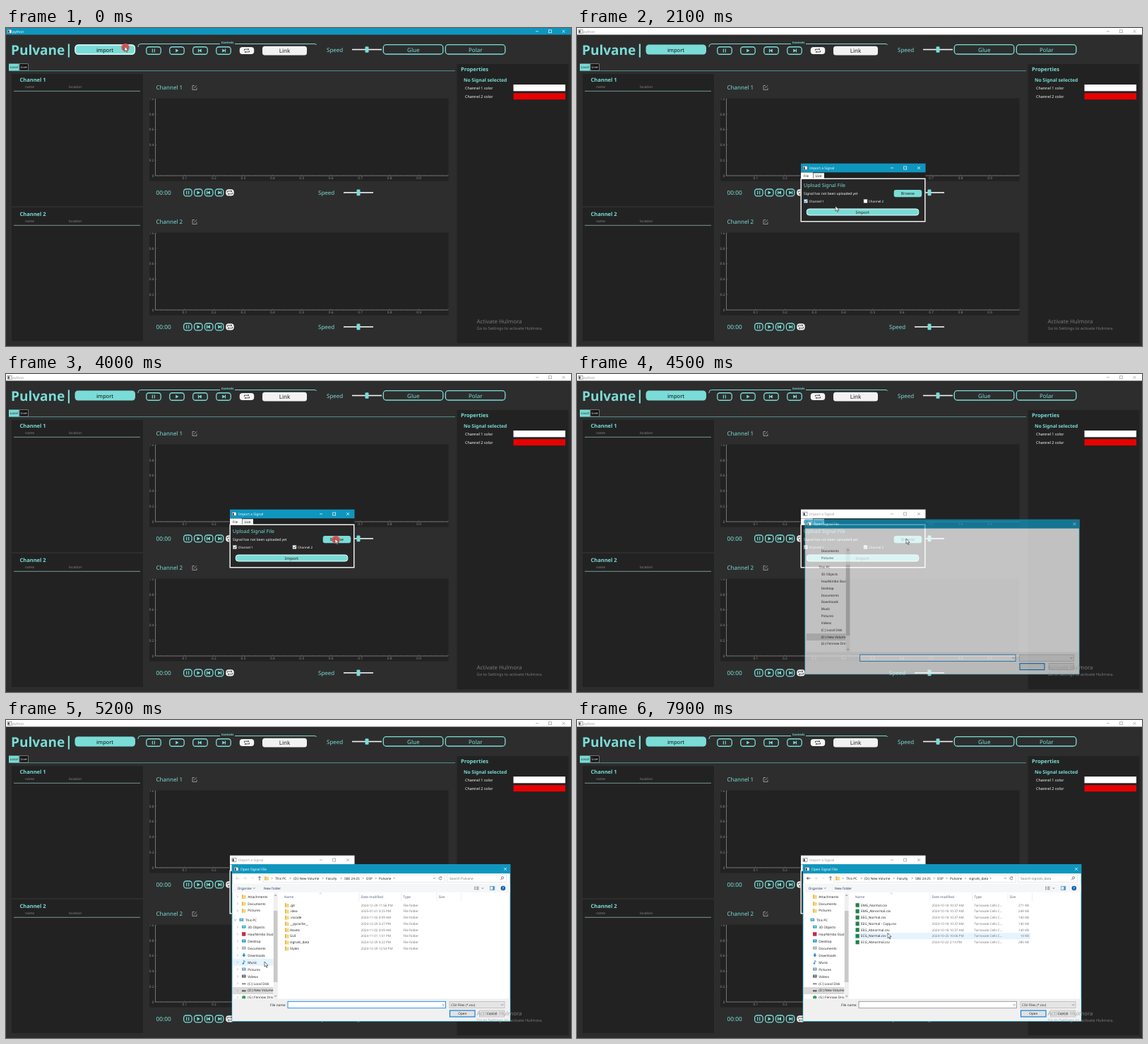
Animation, 800 px wide and 450 px high, one loop 8000 ms. Source, as an HTML page:

```html
<!DOCTYPE html>
<html lang="en">
<head>
<meta charset="utf-8">
<title>Signal viewer</title>
<style>
html, body { margin: 0; width: 100%; height: 100%; overflow: hidden; background: #2d2d2d; }
svg { display: block; width: 100%; height: 100%; }
text { font-family: "Noto Sans", "Open Sans", sans-serif; white-space: pre; text-rendering: geometricPrecision; }
.bar { --bg: #fff; --fg: #999; }
.bar.on { --bg: #0f96be; --fg: #fff; }
.opening .late { display: none; }
</style>
</head>
<body>
<svg id="stage" viewBox="0 0 800 450" preserveAspectRatio="none"></svg>
<script>
const AQUA = '#7adcd7', PANEL = '#222', BLUE = '#0078d7';

// Shape helpers; text is placed by the vertical centre of its capitals.
const rect = (x, y, w, h, fill, more = '') =>
  `<rect x="${x}" y="${y}" width="${w}" height="${h}" fill="${fill}" ${more}/>`;
const text = (x, y, str, size, fill, more = '') =>
  `<text x="${x}" y="${(y + size * 0.357).toFixed(2)}" font-size="${size}" fill="${fill}" ${more}>${str}</text>`;
const line = (d, stroke, width = 1, more = '') =>
  `<path d="${d}" fill="none" stroke="${stroke}" stroke-width="${width}" ${more}/>`;
const shape = (d, fill) => `<path d="${d}" fill="${fill}"/>`;
const group = (id, body, more = '') => `<g id="${id}" ${more}>${body}</g>`;
const MID = 'text-anchor="middle"', END = 'text-anchor="end"', BOLD = 'font-weight="700"';
const stroked = (color, width, r = 0) => `stroke="${color}" stroke-width="${width}" rx="${r}"`;

function titleBar(id, x, y, w, h, title, buttons) {
  const cy = y + h / 2, fg = 'var(--fg)';
  const [min, max, close] = buttons;
  return group(id,
    rect(x, y, w, h, 'var(--bg)') +
    rect(x + 3, cy - 2.5, 6, 5, '#fff', stroked('#555', 0.5)) +
    rect(x + 3.7, cy - 1.3, 2.2, 3.2, '#345') +
    text(x + (w > 700 ? 10 : 12), cy, title, 4.9, fg) +
    (min ? line(`M${min - 2} ${cy}h4`, fg, 0.7) : '') +
    (max ? rect(max - 2, cy - 2, 4, 4, 'none', stroked(fg, 0.7)) : '') +
    line(`M${close - 2} ${cy - 2}l4 4m0 -4l-4 4`, fg, 0.7), 'class="bar"');
}

function glyph(kind, x, y, s, color) {
  const bar = dx => rect(x + dx * s - s * 0.35, y - s * 2, s * 0.9, s * 4, color);
  const tri = dir => shape(`M${x + dir * s * 2} ${y}l${-dir * s * 3.4} ${-s * 2}v${s * 4}z`, color);
  return {
    pause: () => bar(-1.4) + bar(0.9),
    play: () => tri(1),
    prev: () => tri(-1) + bar(-2.1),
    next: () => tri(1) + bar(1.9),
    loop: () => line(`M${x - 2.8 * s} ${y}v${-1.5 * s}h${5 * s}m${-s} ${-s}l${s} ${s}l${-s} ${s}` +
      `M${x + 2.8 * s} ${y}v${1.5 * s}h${-5 * s}m${s} ${-s}l${-s} ${s}l${s} ${s}`, color, 0.75)
  }[kind]();
}

function transport(x, y, gap, w, h, s) {
  return ['pause', 'play', 'prev', 'next', 'loop'].map((kind, i) => {
    const cx = x + gap * i, loop = kind === 'loop';
    const hh = loop ? h - 0.5 : h;
    return rect(cx - w / 2, y - hh / 2, w, hh, loop ? '#f4f4f4' : 'none',
      loop ? 'rx="4"' : stroked(AQUA, 1.3, 3.5)) +
      glyph(kind, cx, y, s, loop ? '#222' : AQUA);
  }).join('');
}

const slider = (x, y) =>
  rect(x, y - 0.8, 42, 1.6, '#f2f2f2') + rect(x + 18.5, y - 4.3, 5, 8.6, AQUA, 'rx="1.2"');

function toolbar() {
  const outlined = (x, label) => rect(x, 23.7, 84.5, 13.3, 'none', stroked(AQUA, 1.3, 4)) +
    text(x + 42.5, 30.8, label, 8, AQUA, MID);
  return text(7, 31, 'Pulvane', 19, AQUA, BOLD) + rect(87.8, 22.5, 2.2, 19, AQUA) +
    rect(97.5, 23.5, 85.5, 14, AQUA, 'rx="4.5"') +
    group('importHover', rect(98, 24, 84.5, 13, 'none', stroked('#e9ffff', 1.3, 4.5))) +
    text(140, 31, 'import', 7.6, '#111', MID) +
    line('M187 27v-1q0 -3.5 4 -3.5H303M324 22.5H437q2 0 2.5 1.5', AQUA, 1) +
    text(313.5, 20, 'Controls', 4.2, AQUA, MID + BOLD) +
    transport(209, 32, 33, 20.5, 10.5, 1.25) +
    rect(363, 25.7, 63, 12.8, '#f2f2f2', 'rx="3.5"') + text(394.5, 32.3, 'Link', 8, '#222', MID) +
    text(454, 31, 'Speed', 8, AQUA) + slider(490, 30.5) +
    outlined(534.3, 'Glue') + outlined(622.3, 'Polar') +
    rect(4, 50.5, 14.5, 10, AQUA) + text(11.2, 55.4, 'Local', 4.7, '#222', MID) +
    rect(19, 50.8, 12.5, 9.2, '#111', stroked('#ccc', 0.5)) + text(25.2, 55.4, 'Live', 4.7, '#fff', MID) +
    line('M4 60.6H636', '#5fa9a5', 0.8);
}

function channel(n) {
  const dy = (n - 1) * 190;
  let axes = line(`M211.5 ${100 + dy}V${209 + dy}H626`, '#999', 0.7);
  for (let i = 0; i <= 50; i++) {
    const x = 211.5 + i * 8.29, major = i % 5 === 0;
    axes += line(`M${x} ${209 + dy}v${major ? -2 : -1}`, '#777', 0.4);
    if (major && i > 0 && i < 50) axes += text(x, 212.3 + dy, (i / 50).toFixed(1), 4.8, '#919191', MID);
  }
  for (let i = 0; i <= 5; i++) {
    const y = 209 - i * 21.8 + dy;
    axes += line(`M211.5 ${y}h2`, '#777', 0.4) +
      text(209.5, y, i ? (i / 5).toFixed(1) : '0', 4.8, '#919191', END);
  }
  return rect(8, 65 + dy - (n - 1), 186, 187 + (n - 1) * 2, PANEL) +
    text(19.5, 73 + dy, 'Channel ' + n, 7.5, AQUA, BOLD) +
    text(27, 83.3 + dy, 'name', 4.9, '#858585') + text(89, 83.3 + dy, 'location', 4.9, '#858585') +
    line(`M11 ${89.3 + dy}H190`, '#8fb5b2', 0.8) +
    text(212.5, 84 + dy, 'Channel ' + n, 8, AQUA) +
    line(`M267 ${81.5 + dy}h-3v6h6v-3M266 ${85.5 + dy}l4 -4.3`, '#aaa', 0.8) +
    rect(203, 99.5 + dy, 423.5, 117, PANEL) +
    `<clipPath id="plot${n}">${rect(203, 99.5 + dy, 424, 117, '#000')}</clipPath>` +
    `<g clip-path="url(#plot${n})">${axes}</g>` +
    text(212.5, 233.3 + dy, '00:00', 8.3, AQUA) +
    transport(257.4, 232.9 + dy, 14.9, 11.5, 9.8, 1.3) +
    text(442, 233.3 + dy, 'Speed', 8, AQUA) + slider(478, 232.9 + dy);
}

const properties = () => rect(638.5, 51, 158, 395, PANEL) +
  text(644, 58.8, 'Properties', 7.5, AQUA, BOLD) +
  text(648, 73.8, 'No Signal selected', 6.7, AQUA, BOLD) +
  text(650, 85.2, 'Channel 1 color', 5.4, '#fff') + rect(718.5, 80, 73.5, 9.3, '#fff') +
  text(650, 97.2, 'Channel 2 color', 5.4, '#fff') + rect(718.5, 92.2, 73.5, 9, '#e80000');

function importDialog() {
  const check = (id, x, label) => rect(x, 242.5, 5, 5, '#fff', `id="${id}Box" ` + stroked('#999', 0.5)) +
    line(`M${x + 1} 245l1.2 1.3l2 -2.7`, '#222', 0.8, `id="${id}"`) +
    text(x + 7, 245.2, label, 4.5, '#fff');
  return rect(316.5, 191.5, 177, 83, '#202020') +
    titleBar('importBar', 317, 191.7, 176.5, 12.6, 'Import a Signal', [446, 464.7, 484]) +
    rect(317, 204.5, 17, 9, '#fff') + text(324.5, 209, 'File', 4.6, '#222', MID) +
    rect(334.5, 205.2, 15.5, 8, '#f0f0f0') + text(342, 209.2, 'Live', 4.6, '#222', MID) +
    rect(317.2, 213.2, 175.6, 60.6, '#272727', stroked('#fff', 1.4)) +
    text(321, 222.3, 'Upload Signal File', 7.05, AQUA) +
    text(321, 234.6, 'Signal has not been uploaded yet', 4.9, '#fff') +
    rect(448.7, 229, 39.5, 10.3, AQUA, 'rx="3"') + text(468.3, 234.3, 'Browse', 5.6, '#222', MID) +
    check('check1', 321.5, 'Channel 1') + check('check2', 406, 'Channel 2') +
    rect(325.3, 256, 158.5, 9, AQUA, stroked('#e9ffff', 1, 3.5)) +
    text(404.5, 260.7, 'Import', 5.9, '#222', MID);
}

const TS = 4.7, INK = '#222', DIM = '#777';
const rowY = i => 262 + i * 8.75;
const FOLDERS = ['.git|2024-12-29 11:56 PM', '.idea|2025-01-01 3:25 PM', '.vscode|2024-11-02 3:09 AM',
  '__pycache__|2024-12-29 3:27 PM', 'Assets|2024-11-02 3:09 AM', 'GUI|2024-11-01 1:51 PM',
  'signals_data|2024-12-29 3:22 PM', 'Styles|2024-12-29 12:54 PM'];
const FILES = ['EMG_Normal|2024-10-18 10:37 AM|271', 'EMG_Abnormal|2024-10-18 10:37 AM|249',
  'EEG_Normal|2024-10-18 10:37 AM|140', 'EEG_Normal - Copy|2024-10-18 10:37 AM|140',
  'EEG_Abnormal|2024-10-18 10:37 AM|140', 'ECG_Normal|2024-10-25 10:06 PM|14',
  'ECG_Abnormal|2024-10-22 2:14 PM|285'];
const PLACES = [['Attachments', '#f3d06c'], ['Documents', '#f3d06c'], ['Pictures', '#f3d06c'],
  ['This PC', '#3c9bd6'], ['3D Objects', '#2ca6c9'], ['HaulNimbo Studio', '#c5284c'],
  ['Desktop', '#1b8fd1'], ['Documents', '#9aa7b0'], ['Downloads', '#2588cf'], ['Music', '#2588cf'],
  ['Pictures', '#6d9fb5'], ['Videos', '#555b66'], ['(C:) Local Disk', '#8a8f94'],
  ['(D:) New Volume', '#555'], ['(G:) Fennow Drive', '#35a35a']];
const placeY = i => i < 3 ? 250 + i * 9.9 : 283 + (i - 3) * 9.98;

const folderIcon = (x, y) => shape(`M${x} ${y - 2.7}h2.3l.7 .8h2.7v4.8h-5.7z`, '#f5d77f') +
  rect(x, y - 2.7, 1.2, 5.6, '#dcae45');

function listing(rows, isFolder) {
  return rows.map((row, i) => {
    const [name, date, size] = row.split('|'), y = rowY(i);
    return (isFolder ? folderIcon(395, y) : rect(394.5, y - 2.8, 5.2, 5.6, '#23804c')) +
      text(402, y, name + (isFolder ? '' : '.csv'), TS, INK) +
      text(502.5, y, date, 4.6, DIM) +
      text(562.5, y, isFolder ? 'File folder' : 'Tarnovale Cells C...', 4.6, DIM) +
      (size ? text(640, y, size + ' KB', 4.6, DIM, END) : '');
  }).join('');
}

function places() {
  const icons = PLACES.map(([, color], i) => {
    const x = i === 3 ? 330.5 : 334, y = placeY(i);
    if (i < 3) return folderIcon(x, y);
    if (i === 5) return rect(x, y - 2.7, 5.4, 5.4, color);
    if (i === 14) return `<circle cx="${x + 2.7}" cy="${y}" r="2.7" fill="${color}"/>`;
    if (i === 8) return shape(`M${x + 1.8} ${y - 2.7}h2v2.4h1.7l-2.7 3l-2.7 -3h1.7z`, color);
    if (i === 9) return line(`M${x + 2.8} ${y + 1.5}v-4l2 1.8`, color, 0.9) +
      `<circle cx="${x + 1.8}" cy="${y + 1.7}" r="1.2" fill="${color}"/>`;
    if (i > 11) return rect(x, y - 0.5, 5.6, 2, color);
    return rect(x, y - 2.3, 5.6, 4, color) + rect(x + 1.2, y - 1.3, 3.2, 1.6, '#fff', 'opacity=".55"');
  }).join('');
  const chevrons = PLACES.map((_, i) => i === 3
    ? line(`M323 ${placeY(i) - 0.8}l1.6 1.6l1.6 -1.6`, '#555', 0.6)
    : line(`M327 ${placeY(i) - 1.6}l1.6 1.6l-1.6 1.6`, '#999', 0.6)).join('');
  const labels = PLACES.map(([name], i) => text(i === 3 ? 339 : 342.3, placeY(i), name, TS, INK)).join('');
  return '<clipPath id="sideClip">' + rect(320.5, 245, 58, 149.5, '#000') + '</clipPath>' +
    `<g clip-path="url(#sideClip)">` + group('side',
      rect(321, 378, 58, 10, '#d9d9d9') + rect(321, 0, 58, 10, '#e5f3ff', 'id="sideHover"') +
      group('sideIcons', icons, 'class="late"') + group('chevrons', chevrons) + labels) + '</g>' +
    rect(378.7, 245, 6, 149.5, '#f0f0f0') + rect(378.9, 270, 5.6, 101, '#c9c9c9') +
    line('M380.3 249l1.4 -1.4l1.4 1.4M380.3 390l1.4 1.4l1.4 -1.4', '#555', 0.7);
}

function fileDialog() {
  const crumbs = [['This PC', 381], ['(D:) New Volume', 407], ['Faculty', 453], ['SBE 24-25', 479],
    ['DSP', 510], ['Pulvane', 528]];
  const chevron = x => line(`M${x} 222.7l1.3 1.3l-1.3 1.3`, '#555', 0.6);
  const header = [['Name', 394], ['Date modified', 502.5], ['Type', 562.5], ['Size', 612.5]];
  const nav = chevron(376) +
    crumbs.map(([name, x], i) => text(x, 224, name, TS, INK) + chevron(i < 5 ? crumbs[i + 1][1] - 5 : 549)).join('') +
    line('M327.3 224h-1M340 224h-4m2.5 -1.8l1.8 1.8l-1.8 1.8', '#ccc', 0.7) +
    line('M330.5 224h-5m2 -2l-2 2l2 2', '#ccc', 0.8, 'id="back"') +
    line('M348 223.2l1.3 1.3l1.3 -1.3', '#aaa', 0.6) +
    line('M359 227v-5.5m-2 2l2 -2l2 2', '#444', 0.8) +
    rect(364, 219, 257.5, 10.3, 'none', stroked('#d9d9d9', 0.6)) + folderIcon(366.3, 224) +
    line('M605 223.2l1.5 1.5l1.5 -1.5M616.5 222.6a2 2 0 1 0 .5 1.8m-.3 -3v1.6h-1.6', '#555', 0.7) +
    rect(624.3, 219, 84.5, 10.3, 'none', stroked('#d9d9d9', 0.6)) +
    '<circle cx="703" cy="223.3" r="1.6" fill="none" stroke="#555" stroke-width=".7"/>' +
    line('M701.9 224.6l-1.8 1.8', '#555', 0.8) +
    rect(320.5, 231.5, 393, 12.3, '#f5f6f7') +
    text(327.7, 238, 'Organise', TS, '#1e395b') + line('M350 237.4l1.2 1.2l1.2 -1.2', '#444', 0.7) +
    text(365, 238, 'New folder', TS, '#1e395b') +
    line('M663 236.2h2m1 0h3.5M663 238h2m1 0h3.5M663 239.8h2m1 0h3.5', '#666', 0.8) +
    line('M673.5 237.4l1.3 1.3l1.3 -1.3', '#444', 0.7) +
    rect(685.5, 235.5, 6.3, 5, '#fff', stroked('#4d86b5', 0.7)) + rect(689, 235.5, 2.8, 5, '#5a9bd0') +
    '<circle cx="703.8" cy="238" r="3.3" fill="#0a5fae"/>' + text(703.8, 238, '?', 5, '#fff', MID + BOLD);
  const list = header.map(([name, x]) => text(x, 250.2, name, TS, '#4c607a')).join('') +
    line('M444 246l1.4 -1.2l1.4 1.2', '#888', 0.5) +
    line('M500 245v11M560 245v11M610 245v11M644.5 245v11', '#e3e3e3', 0.6) +
    rect(392, 0, 250, 8.8, '#e5f3ff', 'id="rowHover"') +
    group('folderView', listing(FOLDERS, true) + text(628, 224, 'Search Pulvane', TS, DIM)) +
    group('fileView', listing(FILES, false) + text(628, 224, 'Search signals_data', TS, DIM) +
      text(555, 224, 'signals_data', TS, INK) + chevron(585));
  const button = (x, label, border, w) => rect(x, 411, 35.5, 9, '#e1e1e1', stroked(border, w)) +
    text(x + 17.8, 415.6, label, TS, INK, MID + 'class="late"');
  const footer = rect(320.5, 394.5, 393, 31.5, '#f0f0f0') +
    text(396.5, 403, 'File name:', TS, INK, END + 'class="late"') +
    rect(399, 398.3, 223.5, 9.4, '#fff', 'id="nameField" stroke-width=".8"') +
    line('M617.6 402.4l1.5 1.5l1.5 -1.5', '#555', 0.7) +
    rect(628, 398.3, 78, 9.4, '#e5e5e5', stroked('#aaa', 0.6)) +
    text(630, 403, 'CSV Files (*.csv)', TS, INK, 'class="late"') +
    line('M701 402.4l1.5 1.5l1.5 -1.5', '#555', 0.7) +
    button(628.5, 'Open', BLUE, 1.1) + button(670.3, 'Cancel', '#adadad', 0.6);
  return rect(320, 204.5, 394, 222, '#fff', stroked('#0f96be', 0.8)) +
    titleBar('fileBar', 320, 204.5, 394, 12.7, 'Open Signal File', [0, 0, 707]) +
    places() + group('nav', nav + list, 'class="late"') + footer;
}

document.getElementById('stage').innerHTML =
  rect(0, 0, 800, 450, '#2d2d2d') +
  titleBar('mainBar', -1, 0, 802, 9.5, 'python', [752, 770.5, 789.5]) +
  toolbar() + channel(1) + channel(2) + properties() +
  group('importDialog', importDialog()) + group('fileDialog', fileDialog()) +
  group('notice', text(666.5, 415.3, 'Activate Hulmora', 7.9, '#929292') +
    text(666.5, 424.7, 'Go to Settings to activate Hulmora.', 5.7, '#929292'), 'opacity=".78"') +
  group('pulse', '<circle r="5.8" fill="#e4504f" opacity=".88"/>' +
    '<circle r="3.6" fill="none" stroke="#b83a3c" stroke-width=".8"/>') +
  group('pointer', '<path d="M0 0v7.2l1.7 -1.5l1.2 2.7l1.1 -.5l-1.2 -2.6h2.3z" fill="#fff" stroke="#222" stroke-width=".6"/>');

const el = Object.fromEntries([...document.querySelectorAll('[id]')].map(node => [node.id, node]));
const show = (node, on) => { node.style.display = on ? '' : 'none'; };

// Tables of [ms, values...]
const POINTER = [[0, 168, 26], [400, 169, 27], [1000, 290, 180], [1400, 325, 245], [1800, 326, 245],
  [2100, 366, 252], [2500, 409, 245], [2900, 409, 245], [3500, 463, 234], [3800, 466, 233],
  [4600, 466, 233], [5200, 366, 342], [5500, 372, 340], [6000, 427, 312], [6400, 428, 312],
  [7000, 440, 301.4]];
const IMPORT_FADE = [[400, 0], [600, 1]];
const FILE_FADE = [[4300, 0], [4500, 0.72], [4700, 1]];
const CLICKS = [[0, 300], [1500, 1800], [2600, 2900], [3800, 4300], [6100, 6500]];

const smooth = p => p * p * (3 - 2 * p);
function sample(table, t, ease = p => p) {
  const next = table.findIndex(step => step[0] > t);
  if (next < 0) return table[table.length - 1].slice(1);
  if (next === 0) return table[0].slice(1);
  const a = table[next - 1], b = table[next];
  const p = ease((t - a[0]) / (b[0] - a[0]));
  return a.slice(1).map((v, i) => v + (b[i + 1] - v) * p);
}

function draw(t) {
  const [x, y] = sample(POINTER, t, smooth);
  const at = `translate(${x} ${y})`;
  el.pointer.setAttribute('transform', at);
  el.pulse.setAttribute('transform', `translate(${x + 1} ${y + 1.5})`);
  show(el.pulse, CLICKS.some(([from, to]) => t >= from && t < to));
  show(el.importHover, t < 500);

  el.mainBar.classList.toggle('on', t < 500);
  el.importBar.classList.toggle('on', t < 4400);
  el.fileBar.classList.add('on');
  el.importDialog.style.opacity = sample(IMPORT_FADE, t)[0];
  show(el.check1, t >= 1600);
  show(el.check2, t >= 2700);
  el.check1Box.setAttribute('stroke', t >= 1400 && t < 2300 ? BLUE : '#999');

  const [fade] = sample(FILE_FADE, t), opening = t < 4700;
  show(el.fileDialog, fade > 0);
  el.fileDialog.style.opacity = fade;
  const scale = 0.95 + 0.05 * Math.min(1, fade);
  el.fileDialog.setAttribute('transform',
    `translate(517 315.5) scale(${opening ? scale : 1}) translate(-517 -315.5)`);
  el.fileDialog.classList.toggle('opening', opening);
  el.side.setAttribute('transform', `translate(${opening ? 1 : 0} ${opening ? -10 : 0})`);

  const inSide = !opening && x < 379 && y > 245;
  const place = PLACES.findIndex((_, i) => Math.abs(placeY(i) - y) < 5);
  show(el.chevrons, inSide);
  show(el.sideHover, inSide && place >= 0);
  if (place >= 0) el.sideHover.setAttribute('y', placeY(place) - 5);

  const inFiles = t >= 6200, row = Math.round((y - 262) / 8.75);
  show(el.rowHover, !opening && x > 392 && row >= 0 && row < 8);
  el.rowHover.setAttribute('y', rowY(row) - 4.4);
  show(el.folderView, !inFiles);
  show(el.fileView, inFiles);
  el.back.setAttribute('stroke', inFiles ? '#333' : '#ccc');
  el.nameField.setAttribute('stroke', t < 6600 ? BLUE : '#8a8a8a');
}

const LOOP = 8000, STEP = 100, start = performance.now();
function tick() {
  const t = (performance.now() - start) % LOOP;
  draw(Math.floor(t / STEP) * STEP);
  requestAnimationFrame(tick);
}
tick();
</script>
</body>
</html>
```
